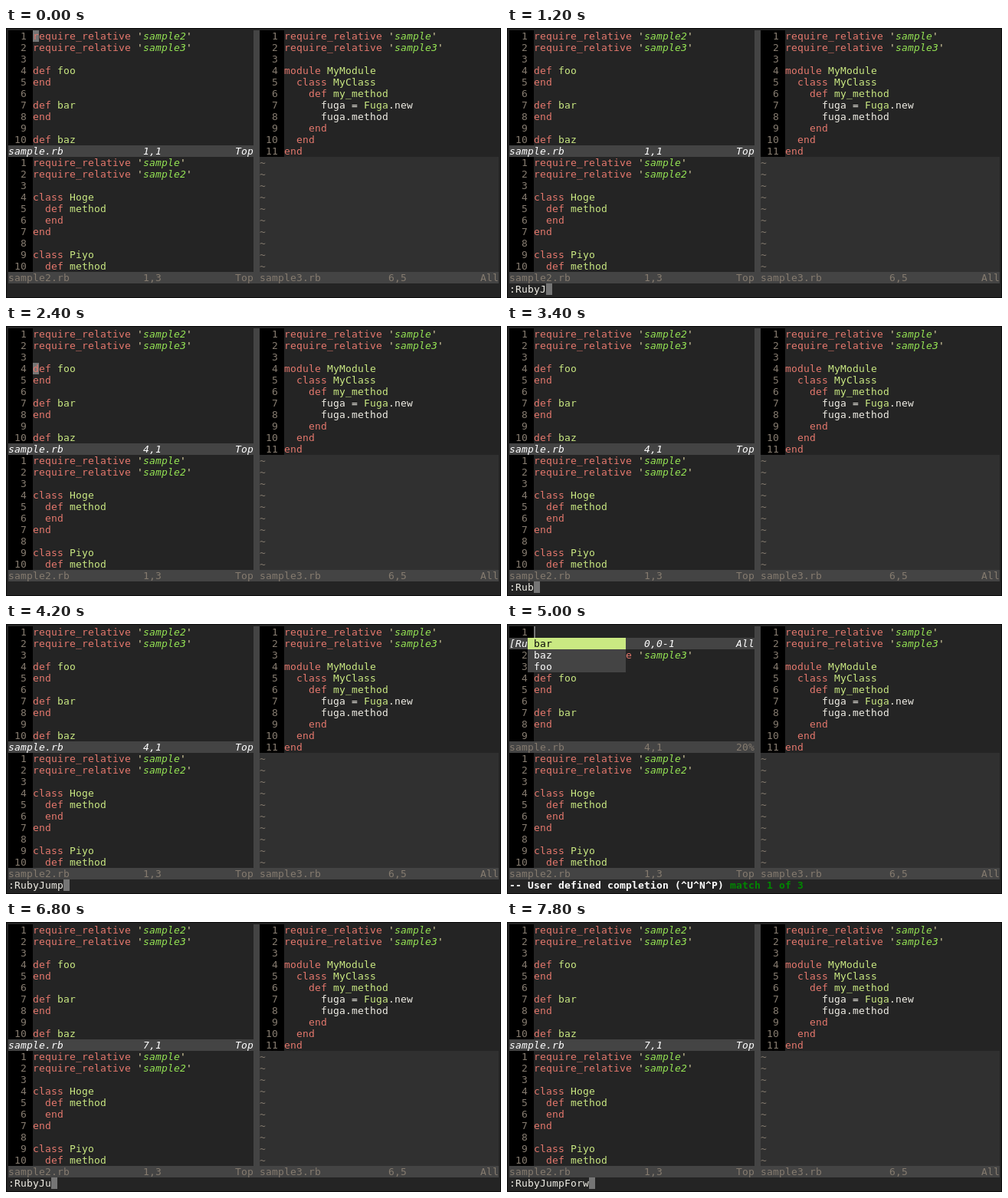
Write an HTML page that moves like this. It is 646 px wide and 352 px high and loops after 8000 ms.

```html
<!DOCTYPE html>
<html lang="en">
<head>
<meta charset="utf-8">
<title>Jump to a definition</title>
<style>
html, body { margin: 0; width: 100%; height: 100%; overflow: hidden; background: #242424; }
#frame { position: absolute; left: 0; top: 0; width: 646px; height: 352px; box-sizing: border-box; border: 1px solid #0c0c0c; }
#screen {
  position: absolute; left: 3px; top: 3px; width: 640px; height: 345px; overflow: hidden;
  font: 13px/15px "DejaVu Sans Mono", monospace; letter-spacing: calc(8px - 1ch);
  color: #f0eee6; font-variant-ligatures: none;
}
#screen b { position: absolute; height: 15px; white-space: pre; font-weight: normal; }
i { font-style: normal; }
.code { background: #242424; }
.num { background: #000; color: #857b6f; }
.key { color: #e5786d; }
.name { color: #cae982; }
.str { color: #95e454; font-style: italic; }
.quote { color: #eadead; }
.tilde { background: #303030; color: #857b6f; }
.split { background: #444; }
.status { background: #444; color: #857b6f; }
.active { color: #fff; font-style: italic; }
.item { background: #444; color: #fff; }
.chosen { background: #cae982; color: #080808; }
.block { background: #757575; }
.caret { box-shadow: inset 2px 0 #757575; }
#screen .mode { font-weight: bold; color: #fff; }
#screen .match { font-weight: bold; color: #008700; }
</style>
</head>
<body>
<div id="frame"></div>
<div id="screen"></div>
<script>
const LOOP = 8000, STEP = 200, CELL = 8, ROW = 15;

const sample = `require_relative 'sample2'
require_relative 'sample3'

def foo
end

def bar
end

def baz`.split("\n");

const sample2 = `require_relative 'sample'
require_relative 'sample2'

class Hoge
  def method
  end
end

class Piyo
  def method`.split("\n");

const sample3 = `require_relative 'sample'
require_relative 'sample3'

module MyModule
  class MyClass
    def my_method
      fuga = Fuga.new
      fuga.method
    end
  end
end`.split("\n");

const keywords = ["require_relative", "def", "end", "class", "module"];
const tag = (cls, text) => `<i class="${cls}">${text}</i>`;

const paint = line => line.replace(/'(\w+)'|\w+/g, (word, str, pos) => {
  if (str) return tag("quote", "'") + tag("str", str) + tag("quote", "'");
  if (keywords.includes(word)) return tag("key", word);
  const named = /^[A-Z]/.test(word) || line.slice(0, pos).endsWith("def ");
  return named ? tag("name", word) : word;
});

// One run of terminal cells; later runs cover earlier ones.
const put = (row, col, html, cls) =>
  `<b class="${cls}" style="left:${col * CELL}px;top:${row * ROW}px">${html}</b>`;

const number = (row, col, n) => put(row, col, String(n).padStart(3) + " ", "num");

function view(lines, row, col, count, first = 1) {
  let html = "";
  for (let k = 0; k < count; k++) {
    const n = first + k;
    html += number(row + k, col, n) + put(row + k, col + 4, paint(lines[n - 1]), "code");
  }
  return html;
}

function status(row, col, width, name, pos, part, active) {
  const text = name.padEnd(width === 80 ? 62 : col ? 21 : 22) + pos;
  return put(row, col, text.padEnd(width - 3) + part, active ? "status active" : "status");
}

function columnRight(top, first) {
  const count = 12 - first, end = top + count;
  let html = view(sample3, top, 41, count, first);
  for (let row = end; row < 21; row++) html += put(row, 41, "~".padEnd(39), "tilde");
  return html;
}

function render({ line, cmd, menu, typed = "", local }) {
  const wide = menu && !local;
  const first = local ? 2 : 1;
  const top = menu ? 2 : 0;
  let html = "";

  for (let row = wide ? 1 : 0; row < 21; row++) html += put(row, 40, " ", "split");
  html += view(sample, top, 0, 10 - top, first);
  html += status(10, 0, 40, "sample.rb", line + ",1", local ? "20%" : "Top", !menu);
  html += view(sample2, 11, 0, 10);
  html += status(21, 0, 41, "sample2.rb", "1,3", "", false) + put(21, 37, "Top ", "status");
  html += wide ? columnRight(2, 2) : columnRight(0, 1);
  html += status(21, 41, 39, "sample3.rb", "6,5", wide ? "Bot" : "All", false);

  if (menu) {
    html += number(0, 0, 1) + put(0, 4, typed, "code") + put(0, 4 + typed.length, " ", "caret");
    html += status(1, 0, wide ? 80 : 40, "[RubyJump]", "0,0-1", "All", true);
    menu.forEach((name, k) => {
      html += put(1 + k, 3, (" " + name).padEnd(16), k ? "item" : "item chosen");
    });
    const mode = "-- User defined completion (^U^N^P) ";
    const note = menu.length > 1 ? "match 1 of " + menu.length : "The only match";
    html += put(22, 0, mode, "mode") + put(22, mode.length, note, "match");
  } else if (cmd) {
    html += put(22, 0, cmd, "code") + put(22, cmd.length, " ", "block");
  } else {
    html += put(line - 1, 4, tag("key", sample[line - 1][0]), "block");
  }
  return html;
}

const type = (line, text, lengths) => lengths.map(n => ({ line, cmd: text.slice(0, n) }));

const all = ["Fuga", "Hoge", "MyClass", "MyModule", "Piyo", "bar", "baz", "foo", "method", "my_method"];
const near = ["bar", "baz", "foo"];

// One state per step of 200 ms.
const states = [
  { line: 1 },
  ...type(1, ":RubyJump", [1, 2, 3, 4, 5, 6, 8, 9]),
  { line: 1, menu: all },
  { line: 1, menu: ["foo"], typed: "f" },
  { line: 1, menu: ["foo"], typed: "fo" },
  { line: 4 }, { line: 4 },
  ...type(4, ":RubyJumpLocal", [1, 2, 3, 4, 5, 6, 8, 9, 11, 13, 14]),
  { line: 4, menu: near, local: true },
  { line: 4, menu: ["bar", "baz"], typed: "b", local: true },
  { line: 4, menu: ["bar", "baz"], typed: "ba", local: true },
  { line: 7 }, { line: 7 },
  ...type(7, ":RubyJumpForward", [1, 2, 4, 5, 7, 8, 9, 9, 11, 13])
];

const screenBox = document.getElementById("screen");
const start = performance.now();
let shown = -1;

function tick() {
  const time = (performance.now() - start) % LOOP;
  const step = Math.floor(time / STEP);
  if (step !== shown) {
    shown = step;
    screenBox.innerHTML = render(states[step]);
  }
  requestAnimationFrame(tick);
}
tick();
</script>
</body>
</html>
```
